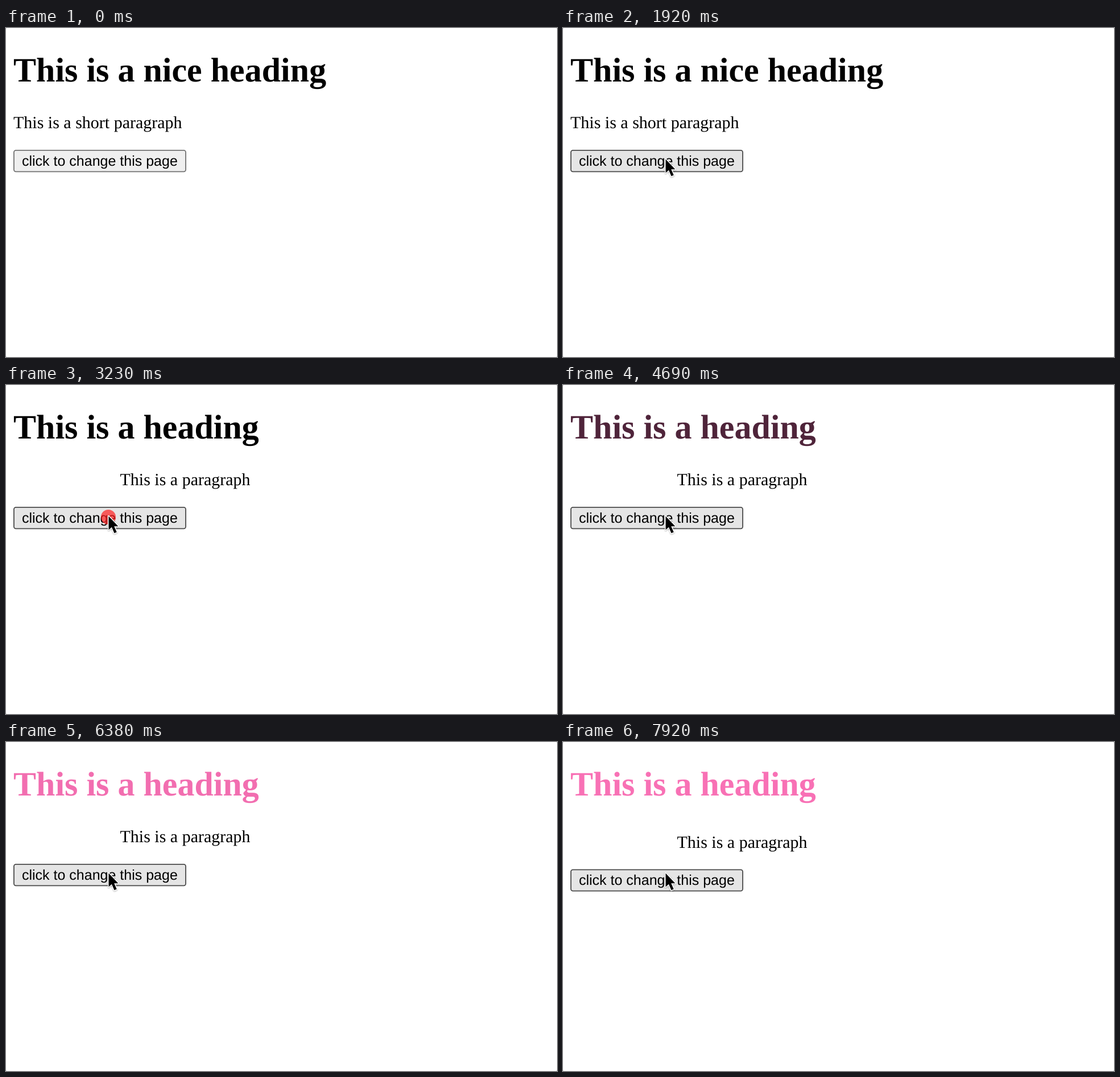
Animation of 969 by 578 pixels, one loop 8000 ms. Source, as an HTML page:

```html
<!DOCTYPE html>
<html lang="en">
<head>
<meta charset="utf-8">
<title>Changing page</title>
<style>
  html, body { margin: 0; width: 100%; height: 100%; overflow: hidden; background: #d4d4d4; }
  svg { display: block; width: 969px; height: 578px; text-rendering: geometricPrecision; }
  .serif { font-family: "Liberation Serif", Times, serif; }
  .sans { font-family: "Liberation Sans", Arial, sans-serif; }
</style>
</head>
<body>
<svg viewBox="0 0 969 578">
  <rect width="969" height="578" rx="2" fill="#fff"/>
  <text id="heading" class="serif" x="13" y="94" font-size="60" font-weight="bold"></text>
  <g id="below">
    <text id="paragraph" class="serif" y="176.3" font-size="30"></text>
    <rect id="button" x="13.9" y="214.9" width="302.2" height="37.4" rx="3.6" stroke-width="1.8"/>
    <text class="sans" x="28" y="242" font-size="25">click to change this page</text>
  </g>
  <circle id="ripple" cx="180" cy="232" fill="#ff1e1e"/>
  <g id="cursor">
    <path d="M0 1.5V25.5L5.4 20.7L10 31.3L14.2 29.5L9.7 19.2H16.8Z"
          stroke="#fff" stroke-width="3" stroke-linejoin="round" paint-order="stroke"
          style="filter: drop-shadow(0 1px 1px rgba(0,0,0,.3))"/>
  </g>
</svg>
<script>
const LOOP = 8000;
const CHANGE_AT = 3080;
const FADE_START = 4080, FADE_LENGTH = 2900;
const PINK = [248, 113, 181];
const DROP_TIMES = [7460, 7690, 7770, 7850, 7920];
const PAGE_PIXEL = 1.875;

// Cursor visits: [time, x, y] points, hidden outside each visit.
const VISITS = [
  [[380, 219, 566], [460, 217.5, 562.5], [540, 218, 580]],
  [[770, 218.5, 566], [850, 213, 562.5], [920, 213, 580]],
  [[1540, 211, 520], [1620, 204, 432], [1690, 195, 345], [1770, 187, 275], [1850, 182, 239], [1920, 180.5, 229]]
];

const $ = id => document.getElementById(id);
const clamp = v => Math.min(1, Math.max(0, v));
const mix = (a, b, p) => a + (b - a) * p;
const progress = (t, start, end) => clamp((t - start) / (end - start));
const bezier = (s, a, b) => 3 * (1 - s) ** 2 * s * a + 3 * (1 - s) * s * s * b + s ** 3;

// The CSS "ease" curve: cubic-bezier(.25, .1, .25, 1).
function ease(x) {
  let low = 0, high = 1;
  for (let i = 0; i < 24; i++) {
    const mid = (low + high) / 2;
    if (bezier(mid, 0.25, 0.25) < x) low = mid; else high = mid;
  }
  return bezier(high, 0.1, 1);
}

function cursorAt(t) {
  const visit = VISITS.findLast(points => t >= points[0][0]);
  if (!visit) return [218, 600];
  const i = visit.findIndex(point => point[0] > t);
  if (i < 0) return visit.at(-1).slice(1);
  const [t0, x0, y0] = visit[i - 1], [t1, x1, y1] = visit[i];
  const p = progress(t, t0, t1);
  return [mix(x0, x1, p), mix(y0, y1, p)];
}

function drawRipple(t) {
  const press = progress(t, 2800, 3000);
  const spread = progress(t, 3230, 3580);
  const visible = t >= 2850 && t < 3540;
  $("ripple").setAttribute("r", mix(13 * press, 47, spread));
  $("ripple").setAttribute("opacity", visible ? 0.7 * (1 - spread) : 0);
}

function draw(t) {
  const changed = t >= CHANGE_AT;
  $("heading").textContent = changed ? "This is a heading" : "This is a nice heading";
  $("paragraph").textContent = changed ? "This is a paragraph" : "This is a short paragraph";
  $("paragraph").setAttribute("x", changed ? 200.5 : 13);

  const tint = ease(progress(t, FADE_START, FADE_START + FADE_LENGTH));
  $("heading").setAttribute("fill", `rgb(${PINK.map(c => Math.round(c * tint))})`);

  const drop = DROP_TIMES.filter(time => t >= time).length * PAGE_PIXEL;
  $("below").setAttribute("transform", `translate(0 ${drop})`);

  const [x, y] = cursorAt(t);
  const hover = y < 253;
  $("cursor").setAttribute("transform", `translate(${x} ${y})`);
  $("button").setAttribute("fill", hover ? "#e5e5e5" : "#efefef");
  $("button").setAttribute("stroke", hover ? "#4b4b4b" : "#727272");
  drawRipple(t);
}

const start = performance.now();
function tick() {
  draw((performance.now() - start) % LOOP);
  requestAnimationFrame(tick);
}
tick();
</script>
</body>
</html>
```
